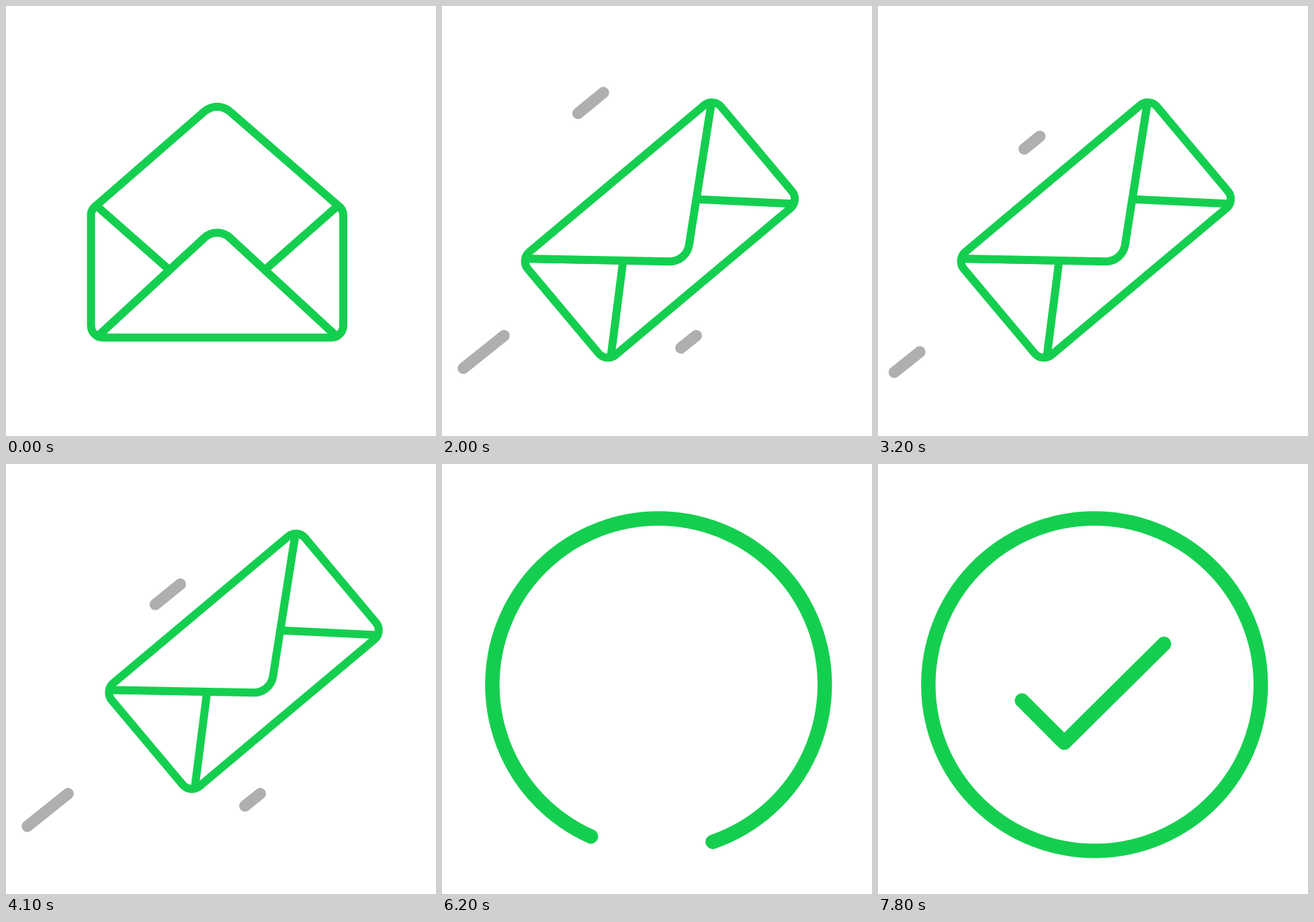
Animation, 640 px wide and 640 px high, one loop 8000 ms. Source, as an HTML page with a canvas:

```html
<!DOCTYPE html>
<html lang="en">
<head>
<meta charset="utf-8">
<title>Message sent</title>
<style>
  html, body { margin: 0; width: 100%; height: 100%; overflow: hidden; background: #fff; }
  canvas { display: block; width: 100vw; height: 100vh; }
</style>
</head>
<body>
<canvas width="640" height="640"></canvas>
<script>
const ctx = document.querySelector('canvas').getContext('2d');
const GREEN = '#14cf4f', GREY = '#afafaf';
const LOOP = 8000, STEP = 100;

const linear = x => x;
const easeIn = x => x * x;
const easeInOut = x => (1 - Math.cos(Math.PI * x)) / 2;

// Value at time t from [time, value, easing into this key] rows.
function track(keys, t) {
  if (t <= keys[0][0]) return keys[0][1];
  for (let i = 1; i < keys.length; i++) {
    const [t1, v1, ease = linear] = keys[i], [t0, v0] = keys[i - 1];
    if (t < t1) return v0 + (v1 - v0) * ease((t - t0) / (t1 - t0));
  }
  return keys[keys.length - 1][1];
}

const REST = [324.3, 333.5], LIFT = [354, 293.7];
const positions = [
  [300, [314.25, 393.5]], [600, [314.25, 393.5]], [800, [305, 377]],
  [1100, [296.5, 355]], [1200, [300.3, 338]], [1400, REST],
];
for (let t = 1700, up = true; t <= 4100; t += 300, up = !up)
  positions.push([t, up ? LIFT : REST, easeInOut]);
positions.push([4400, [900, -170], easeIn]);
const axis = i => positions.map(([t, p, ease]) => [t, p[i], ease]);
const pathX = axis(0), pathY = axis(1);
const flapKeys = [[200, -156.5], [700, 157, easeInOut]];
const tiltKeys = [[600, 0], [1100, -40, easeInOut]];

// Wind streaks: start point, end point, start time, duration.
const CYCLE = 1050;
const streaks = [[225, 200, 146, 263, 1000, 300]];
[1350, 2400, 3450].forEach((t, i) => {
  streaks.push([223, 386, 12, 555, t, CYCLE]);
  streaks.push(i ? [340, 113.5, 210, 219, t, CYCLE] : [322, 62, 190, 170, t, CYCLE]);
  if (i !== 1) streaks.push([428, 451, 348, 515, t, CYCLE]);
});
const streakHead = [[0, 0], [.3, .6], [.62, .907], [1, 1]];

const ringHead = [[4800, -90], [5700, 263], [6200, 431], [7500, 899]];
const ringTail = [[4800, -90], [4900, -76], [6200, 114], [7500, 539]];
const tickDraw = [[7100, 0], [7600, 1]];
const tickScale = [[7500, 1.085], [7600, 1.027], [7700, 1.008], [7800, 1]];

function pen(color, width, cap = 'round') {
  ctx.strokeStyle = color;
  ctx.lineWidth = width;
  ctx.lineCap = cap;
  ctx.lineJoin = 'round';
}

function line(...points) {
  ctx.beginPath();
  points.forEach(([x, y]) => ctx.lineTo(x, y));
  ctx.stroke();
}

// Two slopes meeting in a rounded tip.
function peak(halfWidth, baseY, tipY, radius) {
  ctx.beginPath();
  ctx.moveTo(-halfWidth, baseY);
  ctx.arcTo(0, tipY, halfWidth, baseY, radius);
  ctx.lineTo(halfWidth, baseY);
  ctx.fill();
  ctx.stroke();
}

function drawStreaks(t) {
  pen(GREY, 17);
  for (const [x0, y0, x1, y1, start, duration] of streaks) {
    const tail = (t - start) / duration;
    if (tail <= 0 || tail >= 1) continue;
    const at = k => [x0 + (x1 - x0) * k, y0 + (y1 - y0) * k];
    line(at(tail), at(track(streakHead, tail)));
  }
}

function bodyOutline(closed, w, h, r, top) {
  const body = new Path2D();
  if (closed) {
    body.roundRect(-w, -h, 2 * w, 2 * h, r);
  } else {
    body.moveTo(-180, top);
    body.quadraticCurveTo(-w, -91, -w, -82);
    body.arcTo(-w, h, 0, h, r);
    body.arcTo(w, h, w, 0, r);
    body.lineTo(w, -82);
    body.quadraticCurveTo(w, -91, 180, top);
  }
  return body;
}

function drawEnvelope(t) {
  const flap = track(flapKeys, t), closed = flap >= 0;
  const top = closed ? -95.5 : -96.5;
  const body = bodyOutline(closed, 187.75, 100, 18, top);
  const drawFlap = () => peak(180, top, top + flap, 29);
  ctx.save();
  ctx.translate(track(pathX, t), track(pathY, t));
  ctx.rotate(track(tiltKeys, t) * Math.PI / 180);
  ctx.fillStyle = '#fff';

  pen(GREEN, 12);
  if (closed) ctx.fill(body);
  else drawFlap();

  pen(GREEN, 12, 'butt');
  line([-180, top], [-72, -1.5]);
  line([180, top], [72, -1.5]);
  peak(175, 95.5, -66, 28);
  if (closed) drawFlap();

  // The outline goes last so that no white fill eats into it.
  pen(GREEN, 12);
  ctx.stroke(body);
  ctx.restore();
}

function drawRing(t) {
  const tail = track(ringTail, t);
  const sweep = track(ringHead, t) - tail;
  const from = tail % 360 * Math.PI / 180;
  pen(GREEN, 21.5);
  ctx.beginPath();
  ctx.arc(322.3, 328.4, 247.4, from, from + Math.min(sweep, 359.9) * Math.PI / 180);
  ctx.stroke();
}

function drawTick(t) {
  const drawn = track(tickDraw, t);
  if (!drawn) return;
  const scale = track(tickScale, t), length = 298;
  ctx.save();
  ctx.translate(322.3, 328.4);
  ctx.scale(scale, scale);
  ctx.translate(-322.3, -328.4);
  pen(GREEN, 21.5);
  if (drawn < 1) ctx.setLineDash([length * drawn, 2 * length]);
  line([214.3, 352], [277.2, 414.8], [425.6, 267.8]);
  ctx.restore();
}

function render(t) {
  ctx.fillStyle = '#fff';
  ctx.fillRect(0, 0, 640, 640);
  if (t < 4400) {
    drawStreaks(t);
    drawEnvelope(t);
  } else if (t > 4800) {
    drawRing(t);
    drawTick(t);
  }
}

const begin = performance.now();
function tick() {
  const t = (performance.now() - begin) % LOOP;
  render(Math.floor(t / STEP) * STEP);
  requestAnimationFrame(tick);
}
tick();
</script>
</body>
</html>
```
